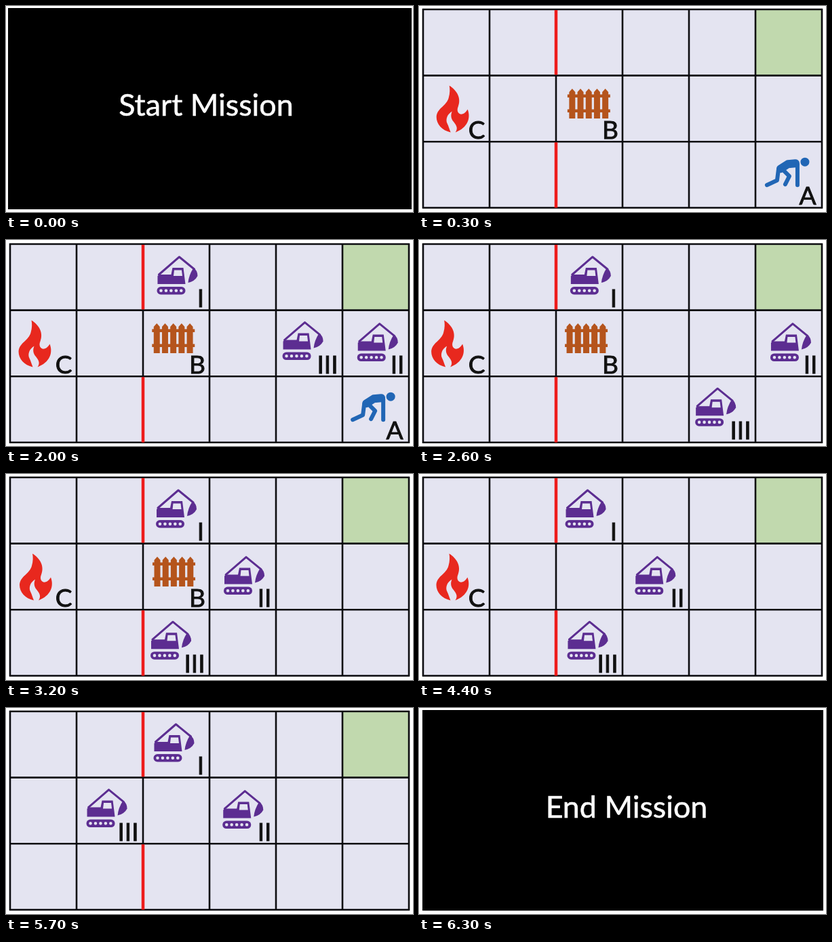
Recreate the animation shown at these times as an HTML page. Size 600 px wide and 304 px high, loop 6.7 s.

```html
<!DOCTYPE html>
<html lang="en">
<head>
<meta charset="utf-8">
<title>Mission</title>
<style>
  html, body { margin: 0; width: 100%; height: 100%; overflow: hidden; background: #fff; }
  svg { display: block; width: 600px; height: 304px; }
  text { font-family: Lato, "Open Sans", sans-serif; text-anchor: middle; }
  .title { font-size: 44.8px; fill: #fff; stroke: #fff; stroke-width: .6; }
  .label { font-size: 37px; fill: #111; stroke: #111; stroke-width: .9; }
  .stroke { fill: none; stroke-linecap: round; stroke-linejoin: round; }
</style>
</head>
<body>
<svg viewBox="0 0 600 304">
  <defs>
    <g id="digger" fill="#5c2d91">
      <path class="stroke" d="M3 28L33 2L55 20" stroke="#5c2d91" stroke-width="3"/>
      <path d="M54 18Q60 22 60 30Q56 38 46 40Q47 29 54 18Z"/>
      <path d="M1 30L4 28H21L23 18H39L42 42H1Z"/>
      <path d="M25.5 21.5H36.5L37.5 30H24.5Z" fill="#e4e4f1"/>
      <rect y="46" width="42" height="11.5" rx="5.7"/>
      <path class="stroke" d="M6 51.7H36" stroke="#e4e4f1" stroke-width="4.6" stroke-dasharray="0 7.45"/>
    </g>
    <path id="fire" fill="#e8281e" d="M19 0C30 7 37 18 32 31C29 38 33 43 38 42C42 41 44 38 46 35C51 48 46 62 28 69C33 62 28 57 25 53C21 48 21 43 23 38C16 42 13 50 16 56C18 60 19 64 21 69C8 66 0 57 0 46C1 33 15 30 18 18C20 11 20 5 19 0Z"/>
    <g id="fence" fill="#b5541c">
      <path d="M0 8.5H63V13H0ZM0 30.5H63V35H0Z"/>
    </g>
    <g id="person" class="stroke" stroke="#2166b5">
      <circle cx="59" cy="6" r="6.5" fill="#2166b5" stroke="none"/>
      <path d="M23 16L34 9L45 8" stroke-width="12"/>
      <path d="M48 10V40" stroke-width="6"/>
      <path d="M27 18L36 27L30 39" stroke-width="6"/>
      <path d="M20 17L18 33L3 40" stroke-width="6"/>
    </g>
  </defs>
  <g id="board"></g>
  <g id="start">
    <rect x="3" y="3" width="595" height="297"/>
    <text class="title" x="295" y="162">Start Mission</text>
  </g>
  <g id="end">
    <rect x="5" y="3" width="591" height="296"/>
    <text class="title" x="306" y="162">End Mission</text>
  </g>
</svg>
<script>
const LOOP = 6700, BEGIN = 300, FINISH = 6300;
const W = 98, H = 97.6;
const HOLDS = [[700, 900], [1200, 1400], [2200, 2500], [5200, 5700]];
const BEATS = [400, 500, 600, 700, 900, 1400, 1700, 2200, 2700, 2900, 4700, 5000];
const MOVES = { L: [-1, 0], U: [0, -1], D: [0, 1] };
const BASE = [5, 0];
const $ = id => document.getElementById(id);
const board = $('board');

function add(parent, tag, attrs, text) {
  const el = document.createElementNS('http://www.w3.org/2000/svg', tag);
  for (const k in attrs) el.setAttribute(k, attrs[k]);
  if (text) el.textContent = text;
  return parent.appendChild(el);
}

for (let i = 0; i < 5; i++)
  add($('fence'), 'path', { d: `M${2.5 + i * 12.2} 44V5l4.5 -5l4.5 5V44Z` });

add(board, 'rect', { width: 6 * W, height: 3 * H, fill: '#e4e4f1' });
add(board, 'rect', { x: 5 * W, width: W, height: H, fill: '#c1d9ae' });
let lines = '';
for (let c = 0; c <= 6; c++) lines += `M${c * W} -1V${3 * H + 1}`;
for (let r = 0; r <= 3; r++) lines += `M-1 ${r * H}H${6 * W + 1}`;
add(board, 'path', { d: lines, stroke: '#0c0c10', 'stroke-width': 2.6 });
add(board, 'path', { d: `M${2 * W} 1V${H - 1}M${2 * W} ${2 * H + 1}V${3 * H}`, stroke: '#ee1c1c', 'stroke-width': 4.5 });

// x, y: icon place in its cell; sway: sideways wander; lx: label centre
// route: one letter per beat, "." waits and "+" enters at the base
const actors = [
  { icon: 'fire', label: 'C', x: 16, y: 15, sway: -4, lx: 79, cell: [0, 1], gone: 5200 },
  { icon: 'fence', label: 'B', x: 15, y: 19.5, sway: -2, lx: 80, cell: [2, 1], gone: 3900 },
  { icon: 'person', label: 'A', x: 13, y: 24, sway: -1, lx: 77, cell: [5, 2], gone: 2500 },
  { icon: 'digger', label: 'I', x: 17, y: 17, sway: 4, lx: 85, route: '+LL..L' },
  { icon: 'digger', label: 'II', x: 20, y: 18, sway: 2, lx: 81, route: '..+D....LL' },
  { icon: 'digger', label: 'III', x: 13, y: 16, sway: -4, lx: 76, route: '...+L.DDLLUL' }
];
for (const a of actors) {
  a.el = add(board, 'g', {});
  a.pic = add(a.el, 'use', { href: '#' + a.icon });
  add(a.el, 'text', { class: 'label', x: a.lx, y: 93 }, a.label);
}

function cellAt(actor, t) {
  if (actor.cell) return t < actor.gone ? actor.cell : null;
  const done = actor.route.slice(0, BEATS.filter(b => b <= t).length);
  if (!done.includes('+')) return null;
  return [...done].reduce(([c, r], step) => {
    const [dc, dr] = MOVES[step] || [0, 0];
    return [c + dc, r + dr];
  }, BASE);
}

const move = (el, x, y) => el.setAttribute('transform', `translate(${x} ${y})`);
const show = (el, on) => el.setAttribute('display', on ? 'inline' : 'none');

function draw(time) {
  let t = Math.floor(time / 100) * 100;
  for (const [from, to] of HOLDS) if (t >= from && t < to) t = from;
  show($('start'), t < BEGIN);
  show($('end'), t >= FINISH);
  show(board, t >= BEGIN && t < FINISH);
  const wave = Math.sin(2 * Math.PI * (t - 1200) / 4800);
  move(board, 6, Math.round(5.1 + 0.5 * wave));
  for (const a of actors) {
    const cell = cellAt(a, t);
    show(a.el, cell);
    if (!cell) continue;
    move(a.el, cell[0] * W, cell[1] * H);
    move(a.pic, a.x + a.sway * wave, a.y);
  }
}

const t0 = performance.now();
function tick() {
  draw((performance.now() - t0) % LOOP);
  requestAnimationFrame(tick);
}
tick();
</script>
</body>
</html>
```
